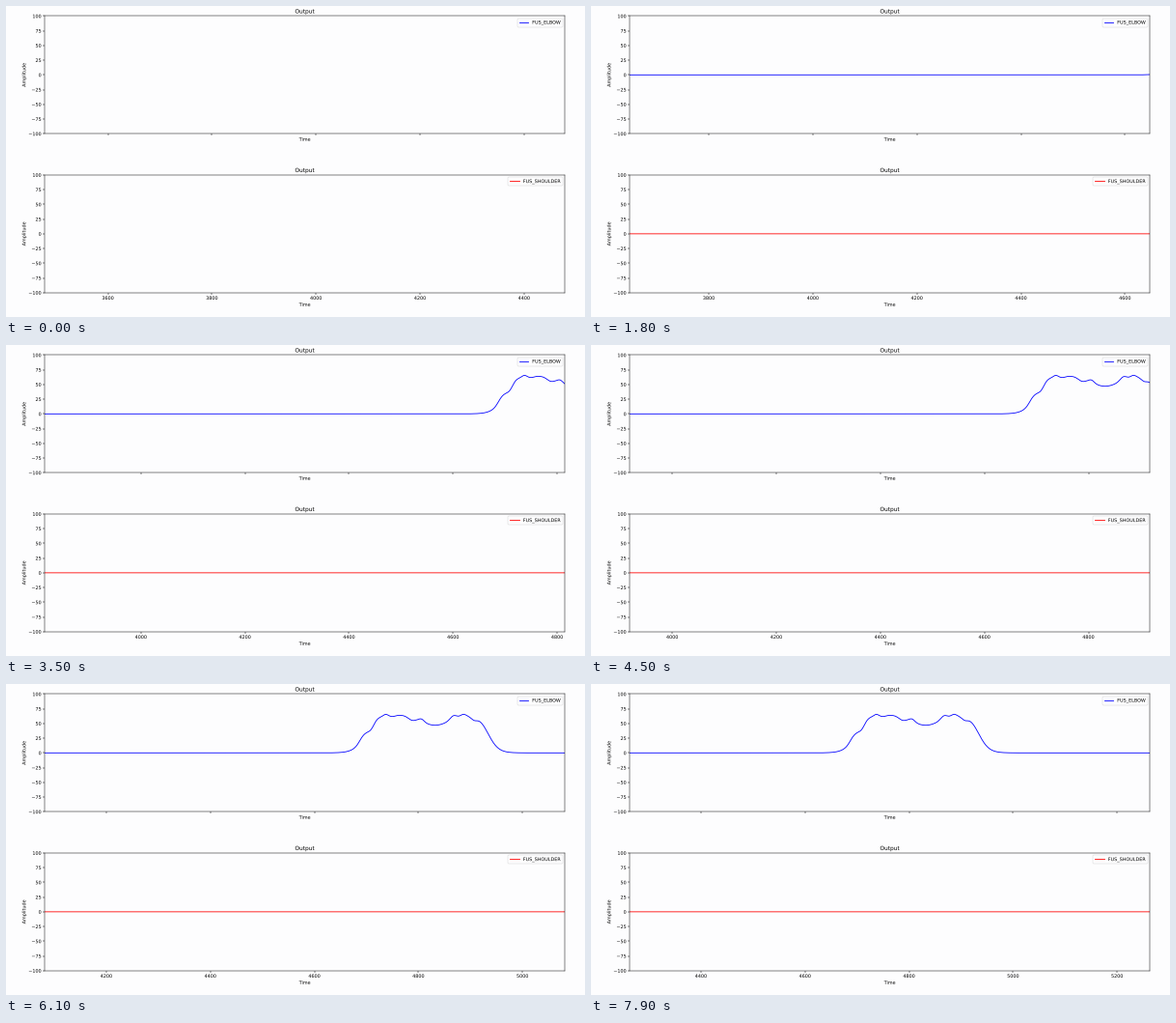
A matplotlib script for the animation above (8000 ms loop, 600 by 322 pixels).

```python
import numpy as np
import matplotlib.pyplot as plt
from matplotlib import patheffects
from matplotlib.animation import FuncAnimation
from matplotlib.ticker import MultipleLocator

W, H, DPI = 600, 322, 35
FRAMES, STEP_MS = 80, 100
SPAN = 1000
BG = "#fdfdfe"

plt.rcParams.update({
    "font.family": "DejaVu Sans",
    "text.hinting": "none",
    "path.effects": [patheffects.Normal()],  # text as paths: subpixel spacing
    "figure.facecolor": BG,
    "axes.facecolor": BG,
    "axes.linewidth": 1.0,
    "xtick.major.width": 1.0,
    "ytick.major.width": 1.0,
    "lines.linewidth": 1.7,
})

# Newest sample over time: a few (step, sample) points, about 10 per step
CLOCK = np.array([(1, 4478.5), (10, 4577), (25, 4710),
                  (35, 4815), (54, 5011), (79, 5263)])

# Bumps on the elbow pulse: centre, height, width
BUMPS = [(4691, 4, 6), (4709, -8, 6), (4737, 2.5, 4), (4750, -2.5, 6),
         (4787, -5, 7), (4806, 4, 5), (4832, -18, 27), (4867, 6, 6),
         (4886, 3.5, 5), (4907, -5.5, 6)]


def logistic(x):
    return 1 / (1 + np.exp(-x))


def pulse(x):
    y = 65 * logistic((x - 4698) / 10.8) * logistic((4934 - x) / 9.9)
    for centre, height, width in BUMPS:
        y += height * np.exp(-((x - centre) / width) ** 2 / 2)
    return y


def refreshed(step):
    """Last step at which the plot was redrawn."""
    if step < 2:
        return 0
    if 8 < step < 18:  # slow start: every third step
        return max(8, (step - 1) // 3 * 3 + 1)
    stalled = step in range(33, 40, 3) or step in range(55, 80, 15)
    return step - stalled


samples = np.arange(3400, 5301)
elbow = pulse(samples)
shoulder = np.zeros(len(samples))

fig, axes = plt.subplots(2, 1, sharex=True, figsize=(W / DPI, H / DPI), dpi=DPI)
fig.subplots_adjust(left=40.1 / W, right=579.2 / W, top=1 - 10.4 / H,
                    bottom=1 - 296.8 / H, hspace=0.35)


def make_plot(ax, color, label):
    line, = ax.plot([], [], color=color, label=label, snap=False)
    ax.set(title="Output", xlabel="Time", ylabel="Amplitude", ylim=(-100, 100))
    ax.xaxis.set_major_locator(MultipleLocator(200))
    ax.yaxis.set_major_locator(MultipleLocator(25))
    ax.legend(loc="upper right")
    return line


lines = [make_plot(axes[0], "blue", "FUS_ELBOW"),
         make_plot(axes[1], "red", "FUS_SHOULDER")]


def update(frame):
    step = refreshed(frame)
    newest = np.interp(step, *CLOCK.T)
    axes[0].set_xlim(newest - SPAN, newest)
    shown = (samples <= newest + 1) & (step > 0)
    for line, data in zip(lines, (elbow, shoulder)):
        line.set_data(samples[shown], data[shown])
    return lines


anim = FuncAnimation(fig, update, frames=FRAMES, interval=STEP_MS,
                     init_func=lambda: update(0), repeat=True,
                     repeat_delay=0, blit=False)
plt.show()
```
